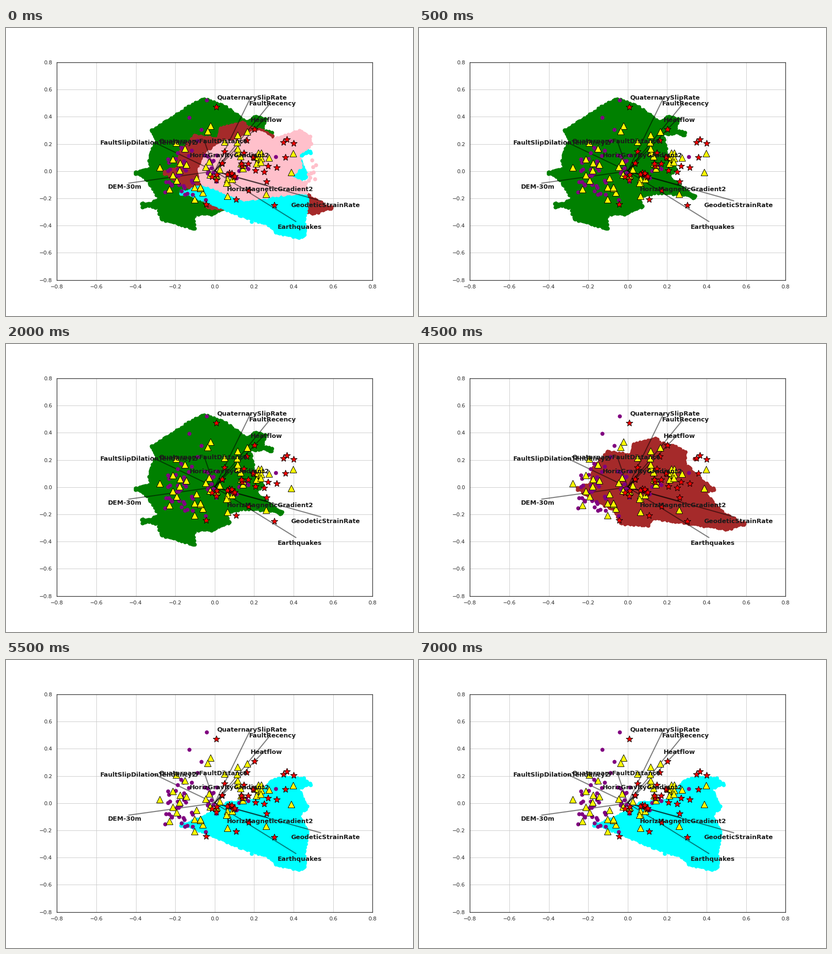
Recreate the animation shown at these times as a matplotlib script. Size 842x595 px, loop 8 s.

```python
import numpy as np
import matplotlib.pyplot as plt
from matplotlib.animation import FuncAnimation

W, H, DPI = 842, 595, 72
INK = "0.15"
LIMIT = 0.8
LEFT, BOTTOM, WIDE, TALL = 105.3, 74.43, 652.86, 449.56  # axes box in pixels
ORIGIN = np.array([LEFT + WIDE / 2, H - BOTTOM - TALL / 2])
STEP, FRAMES = 500, 16

plt.rcParams["font.family"] = "DejaVu Sans"
rng = np.random.default_rng(4)

# Corners of each cluster, clockwise, in stage pixels (y down)
GREEN = [
    (408, 142), (455, 158), (497, 190), (516, 178), (540, 186), (535, 208),
    (553, 220), (508, 222), (516, 262), (534, 292), (521, 306), (574, 350),
    (490, 343), (460, 353), (466, 370), (426, 388), (392, 388), (392, 418),
    (318, 398), (312, 375), (277, 366), (312, 352), (292, 318), (264, 298),
    (294, 287), (293, 262), (308, 230), (296, 210), (345, 180), (378, 158),
]
BROWN = [
    (390, 219), (436, 226), (441, 205), (490, 190), (500, 201), (530, 208),
    (554, 222), (552, 245), (590, 281), (614, 301), (596, 308), (630, 345),
    (677, 372), (640, 386), (484, 363), (475, 377), (416, 374), (404, 348),
    (372, 330), (335, 308), (323, 298), (353, 284), (357, 254),
]
CYAN = [
    (358, 341), (418, 316), (455, 293), (514, 285), (546, 247), (575, 239),
    (617, 241), (634, 258), (609, 268), (627, 304), (610, 322), (627, 355),
    (620, 400), (622, 430), (605, 437), (558, 426), (540, 408), (485, 391),
    (400, 355),
]
PINK = [
    (396, 293), (412, 258), (450, 231), (480, 231), (500, 214), (530, 212),
    (551, 227), (608, 209), (631, 222), (634, 242), (609, 262), (613, 288),
    (592, 306), (623, 318), (624, 342), (568, 347), (493, 358), (403, 323),
]

# Markers: isolated points, then groups as (x, y, half width, half height, count)
PURPLE = [(415, 149), (379, 185), (404, 210), (396, 233), (558, 266), (413, 355)]
PURPLE_GROUPS = [(358, 294, 30, 50, 34), (426, 290, 18, 28, 12),
                 (486, 299, 28, 13, 5)]
TRIANGLES = [
    (423, 202), (417, 213), (352, 237), (370, 249), (318, 288), (338, 333),
    (390, 354), (458, 347), (538, 343), (590, 298), (594, 259), (544, 268),
    (499, 214), (479, 221), (452, 235),
]
TRIANGLE_GROUPS = [(360, 293, 18, 24, 6), (400, 325, 16, 15, 6),
                   (428, 290, 16, 18, 5), (464, 320, 11, 10, 4),
                   (482, 262, 10, 28, 7), (522, 267, 10, 15, 7)]
STARS = [
    (435, 163), (514, 209), (498, 232), (452, 255), (574, 236), (581, 230),
    (595, 238), (578, 267), (560, 288), (539, 317), (502, 335), (476, 354),
    (414, 364), (555, 366),
]
STAR_GROUPS = [(448, 279, 2, 2, 2), (500, 270, 15, 16, 6),
               (470, 302, 13, 7, 6), (434, 309, 15, 7, 3),
               (529, 290, 14, 10, 3)]

# Centre of each label; its line ends at a matching point
LABELS = {
    "QuaternarySlipRate": (509, 144),
    "FaultRecency": (551.5, 156),
    "Heatflow": (538.5, 190),
    "FaultSlipDilationTendency2": (295, 237),
    "QuaternaryFaultDistance": (408.5, 234),
    "HorizGravityGradient2": (462, 263),
    "HorizMagneticGradient2": (546, 333),
    "DEM-30m": (245.5, 328),
    "GeodeticStrainRate": (661, 366),
    "Earthquakes": (607.5, 411),
}

fig = plt.figure(figsize=(W / DPI, H / DPI), dpi=DPI, facecolor="white")
ax = fig.add_axes([LEFT / W, BOTTOM / H, WIDE / W, TALL / H])
ticks = np.linspace(-LIMIT, LIMIT, 9)
ax.set(xlim=(-LIMIT, LIMIT), ylim=(-LIMIT, LIMIT), xticks=ticks, yticks=ticks)
ax.tick_params(length=0, pad=9.5, labelsize=11, labelcolor=INK)
ax.grid(color="0.8", linewidth=1)
ax.set_axisbelow(True)
for spine in ax.spines.values():
    spine.set(color=INK, linewidth=1.25)


def to_data(points):
    """Stage pixels to axes units, as separate x and y."""
    offset = np.asarray(points, float) - ORIGIN
    return (offset * [2 * LIMIT / WIDE, -2 * LIMIT / TALL]).T


def scatter_box(x, y, dx, dy, count):
    return rng.uniform((x - dx, y - dy), (x + dx, y + dy), (count, 2))


def dots(points, marker, color, size, z, edge=None):
    return ax.plot(*to_data(points), marker, color=color, ms=size, zorder=z,
                   mec=edge or color, mew=1 if edge else 0)[0]


def markers(points, groups, *style):
    dots(np.vstack([points] + [scatter_box(*g) for g in groups]), *style)


def cloud(corners, color, z, strays=None):
    """Filled blob whose rim is a row of jittered dots."""
    p = np.array(corners + corners[:1], float)
    dist = np.r_[0, np.cumsum(np.hypot(*np.diff(p, axis=0).T))]
    s = np.arange(0, dist[-1], 3.5)
    rim = np.stack([np.interp(s, dist, axis) for axis in p.T], axis=-1)
    along = np.roll(rim, -1, axis=0) - np.roll(rim, 1, axis=0)
    along /= np.hypot(*along.T)[:, None] + 1e-9
    inward = along[:, ::-1] * [-1, 1]
    rim += inward * rng.uniform(2.5, 6, (len(rim), 1))
    body = ax.fill(*to_data(rim), color=color, lw=0, zorder=z)[0]
    if strays:
        rim = np.vstack([rim, scatter_box(*strays)])
    return body, dots(rim, "o", color, 8.3, z)


clouds = [
    cloud(GREEN, "green", 2.0),
    cloud(BROWN, "brown", 2.1, (574, 236, 4, 2, 3)),
    cloud(CYAN, "cyan", 2.2, (508, 404, 36, 8, 3)),
    cloud(PINK, "pink", 2.3, (633, 287, 9, 52, 9)),
]

markers(PURPLE, PURPLE_GROUPS, "o", "purple", 8.3, 3.0)
markers(TRIANGLES, TRIANGLE_GROUPS, "^", "yellow", 13.5, 3.1, "black")
markers(STARS, STAR_GROUPS, "*", "red", 14, 3.2, "black")

for name, centre in LABELS.items():
    tip = ORIGIN + 0.96 * (np.array(centre) - ORIGIN - [0, 6.3])
    ax.plot(*to_data([ORIGIN, tip]), color="black", alpha=0.5, lw=2.2,
            solid_capstyle="butt", zorder=2.8)
    ax.text(*to_data(np.add(centre, (0, 4))), name, size=13, weight="bold",
            color="0.1", ha="center", va="baseline", zorder=4)


def update(i):
    # All clusters for one step, then each of three alone for five
    for k, parts in enumerate(clouds):
        for part in parts:
            part.set_visible(i == 0 or k == (i - 1) // 5)
    return []


anim = FuncAnimation(fig, update, frames=FRAMES, interval=STEP,
                     init_func=lambda: update(0), repeat=True, repeat_delay=0)
plt.show()
```
